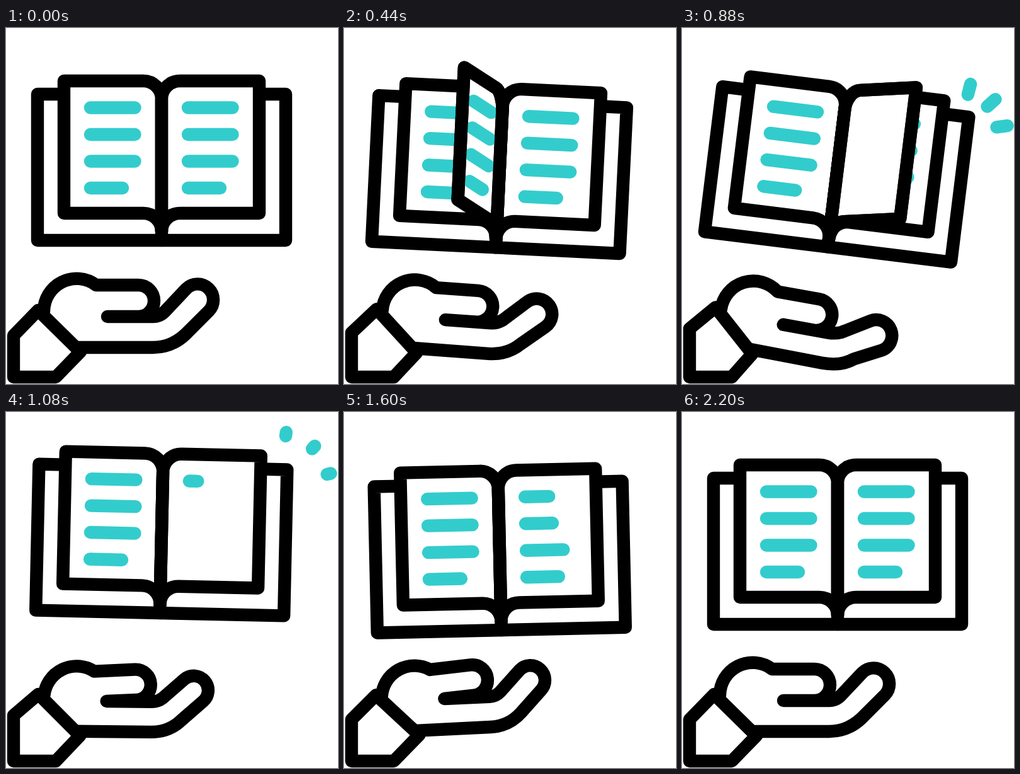
Recreate the animation shown at these times as an HTML page. Size 527x565 px, loop 2400 ms.

```html
<!DOCTYPE html>
<html lang="en">
<head>
<meta charset="utf-8">
<title>Book and hand</title>
<style>
  html, body { margin: 0; width: 100%; height: 100%; overflow: hidden; background: #fff; }
  svg { display: block; width: 527px; height: 565px; }
  path { fill: none; stroke: #000; stroke-width: 20.4; stroke-linecap: round; stroke-linejoin: round; }
  .paper { fill: #fff; }
  .ink { stroke: #33cccc; }
</style>
</head>
<body>
<svg viewBox="0 0 527 565">
  <g id="book">
    <path class="paper" d="M92 105H50V337H444V105H402"/>
    <path class="paper" d="M247 113A29 29 0 0 0 218 84H92V294H218A29 29 0 0 1 247 323Z"/>
    <path class="paper" d="M247 113A29 29 0 0 1 276 84H402V294H276A29 29 0 0 0 247 323Z"/>
    <g id="lines"></g>
    <g id="leaf"><path class="paper" id="sheet"/><path class="ink" id="sheetText"/></g>
    <path id="edge"/>
    <path d="M247 113V337"/>
    <g id="sparks"></g>
  </g>
  <path id="cuff"/>
  <path id="hand"/>
</svg>
<script>
const LOOP = 2400, START = 220, TEXT_START = 1000;
const SPINE = 247, PAGE = 155, LEAF_RISE = 51;

const el = id => document.getElementById(id);
const set = (node, d) => node.setAttribute('d', d);
const show = (node, on) => node.setAttribute('visibility', on ? 'inherit' : 'hidden');
const lerp = (a, b, k) => a + (b - a) * k;
const mix = (a, b, k) => a.map((p, i) => [lerp(p[0], b[i][0], k), lerp(p[1], b[i][1], k)]);
const pt = ([x, y]) => `${x.toFixed(2)} ${y.toFixed(2)} `;

function ease(t, from, to) {
  const u = Math.min(1, Math.max(0, (t - from) / (to - from)));
  return u * u * (3 - 2 * u);
}

// Keys are [time, value] pairs, eased between neighbours.
function keyed(keys, t, blend = lerp) {
  let i = 0;
  while (i < keys.length - 2 && t >= keys[i + 1][0]) i++;
  const [t0, a] = keys[i], [t1, b] = keys[i + 1];
  return blend(a, b, ease(t, t0, t1));
}

function rotate([x, y], [cx, cy], degrees) {
  const r = degrees * Math.PI / 180, c = Math.cos(r), s = Math.sin(r);
  return [cx + (x - cx) * c - (y - cy) * s, cy + (x - cx) * s + (y - cy) * c];
}

function addPath(parent) {
  const p = document.createElementNS('http://www.w3.org/2000/svg', 'path');
  p.setAttribute('class', 'ink');
  return parent.appendChild(p);
}

// The hand bends at three joints; a pose is one list of outline points.
const WRIST = [89, 463], KNUCKLE = [240, 461], THUMB = [161, 458];

function pose(wrist, finger, thumb, cuffLift) {
  const turn = (joint, extra) => p => rotate(rotate(p, joint, extra), WRIST, wrist);
  const palm = turn(WRIST, 0), thumbed = turn(THUMB, thumb);
  const fingered = turn(KNUCKLE, finger), halfway = turn(KNUCKLE, finger / 2);
  const heel = p => rotate(p, WRIST, wrist * 0.7);
  return [
    heel([60, 450]), thumbed([143, 408]), thumbed([210, 408]), thumbed([210, 458]), palm(THUMB),
    palm([234, 458]), palm([244, 458]), fingered([252, 450]), fingered([286, 414]),
    fingered([322, 449]), halfway([285, 486]), palm([263, 507]), palm([233, 507]), heel([112, 507]),
    heel([51, 448]), [12, 488 - cuffLift], heel([118, 514])
  ];
}

const rest = pose(0, 0, 0, 0), down = pose(10.3, 15, 0, 11);
const up = pose(-13, -10, -8, 0), caught = pose(8.5, 12.5, 0, 0);

const POSE = [[START, rest], [735, down], [860, down], [1360, up], [1850, caught], [2200, rest]];
const TILT = [[START, 0], [735, 7.1], [860, 7.1], [1360, -7], [1850, 4.75], [2200, 0]];
const LIFT = [[START, 0], [620, 20], [775, 20], [1130, -20], [1180, -20], [1820, 20], [2200, 0]];
const WRITING = [[TEXT_START, 0], [1290, 1], [1575, 0.53], [1880, 1]];

const rows = [0, 1, 2, 3].map(i => ({
  y: 126.5 + 42.5 * i, width: i < 3 ? 70.5 : 51, delay: 100 * i, node: addPath(el('lines'))
}));
const sparks = [0, 1, 2].map(i => ({ angle: -82.5 + 34 * i, node: addPath(el('sparks')) }));
set(addPath(el('lines')), rows.map(r => `M134 ${r.y}h${r.width}`).join(''));

function drawHand(t) {
  const p = keyed(POSE, t, mix).map(pt);
  // Unit radii grow to fit, which makes both tips exact semicircles.
  set(el('hand'), `M${p[0]}A52 52 0 0 1 ${p[1]}L${p[2]}A1 1 0 0 1 ${p[3]}L${p[4]}L${p[5]}` +
    `Q${p[6]}${p[7]}L${p[8]}A1 1 0 0 1 ${p[9]}L${p[10]}Q${p[11]}${p[12]}L${p[13]}`);
  set(el('cuff'), `M${p[14]}L${p[15]}L12 554L79 554L${p[16]}Z`);
}

// Turning page: squeezed toward the spine and sheared upward.
function drawLeaf(t) {
  const active = t >= START && t < TEXT_START;
  show(el('leaf'), active);
  show(el('edge'), active);
  if (!active) return;
  const turn = lerp(-1, 1, (t - START + 12) / (TEXT_START - START + 12));
  const rise = LEAF_RISE * (1 - Math.abs(turn));
  const at = (d, y) => pt([SPINE + turn * d, y - rise * (1.23 * d / PAGE - 0.23)]);
  const outline = `M${at(0, 113)}C${at(0, 97)}${at(13, 84)}${at(29, 84)}L${at(PAGE, 84)}` +
    `L${at(PAGE, 294)}L${at(29, 294)}C${at(13, 294)}${at(0, 307)}${at(0, 323)}`;
  set(el('sheet'), outline + 'Z');
  set(el('edge'), outline);
  show(el('sheetText'), turn < 0);
  set(el('sheetText'), rows.map(r => `M${at(113, r.y)}L${at(113 - r.width, r.y)}`).join(''));
}

function drawRows(t) {
  for (const { y, width, delay, node } of rows) {
    const k = t < TEXT_START ? 1 : keyed(WRITING, t - delay);
    show(node, k > 0.001);
    set(node, `M289 ${y}h${(width * k).toFixed(2)}`);
  }
}

// Rays of one fan: the head runs out first, then the tail follows.
function drawSparks(t) {
  const head = ease(t, 450, 1040), tail = ease(t, 620, 1230);
  const centre = [430, 131];
  for (const { angle, node } of sparks) {
    const at = k => pt(rotate([centre[0] + lerp(46, 86, k), centre[1]], centre, angle));
    show(node, head > 0.005 && tail < 0.992);
    set(node, `M${at(tail)}L${at(head)}`);
  }
}

function render(t) {
  el('book').setAttribute('transform',
    `translate(0 ${keyed(LIFT, t)}) rotate(${keyed(TILT, t)} ${SPINE} 210)`);
  drawRows(t);
  drawLeaf(t);
  drawSparks(t);
  drawHand(t);
}

function frame(now) {
  render(now % LOOP);
  requestAnimationFrame(frame);
}
render(0);
requestAnimationFrame(frame);
</script>
</body>
</html>
```
